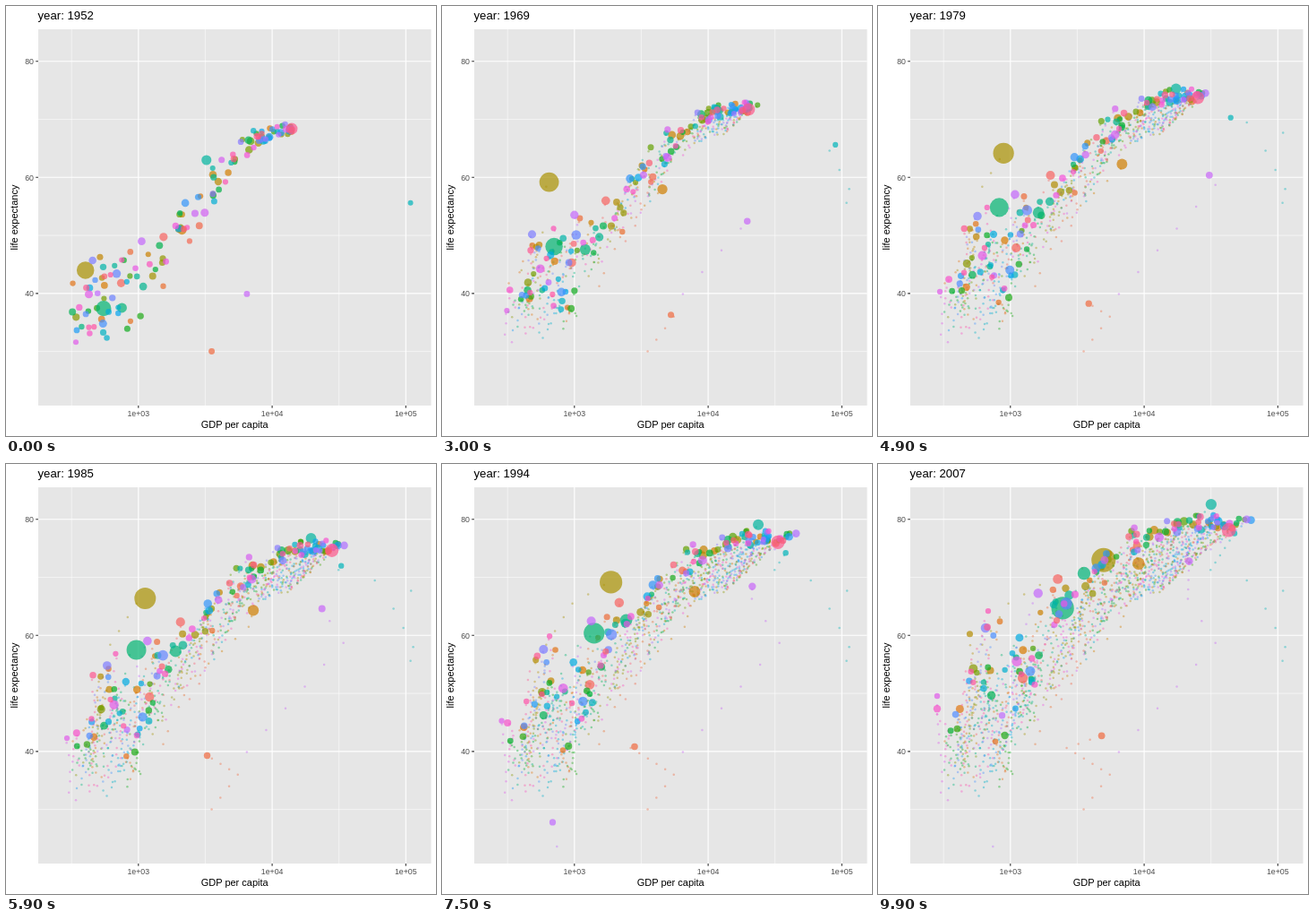
Animation of 480 by 480 pixels, one loop 10000 ms. Source, as an HTML page with a canvas:

```html
<!DOCTYPE html>
<html lang="en">
<head>
<meta charset="utf-8">
<title>Life expectancy and GDP per capita</title>
<style>
  html, body { margin: 0; width: 100%; height: 100%; overflow: hidden; background: #fff; }
  svg, canvas { position: absolute; left: 0; top: 0; width: 480px; height: 480px; }
  text { font: 11px "Liberation Sans", Arial, sans-serif; }
  .tick text { font-size: 8.8px; fill: #4d4d4d; }
  .mid { text-anchor: middle; }
  .end { text-anchor: end; }
  #year { font-size: 13.2px; }
</style>
</head>
<body>
<svg viewBox="0 0 480 480">
  <rect x="36" y="26" width="438.5" height="420" fill="#e6e6e6"/>
  <g stroke="#fff">
    <path stroke-width=".55" d="M73.2 26v420M222.4 26v420M371.7 26v420M36 126.5h438.5M36 256.1h438.5M36 385.6h438.5"/>
    <path stroke-width="1.1" d="M147.8 26v420M297.1 26v420M446.3 26v420M36 61.8h438.5M36 191.3h438.5M36 320.9h438.5"/>
  </g>
  <path stroke="#333" stroke-width="1.1" d="M147.8 446v2.8M297.1 446v2.8M446.3 446v2.8M33.2 61.8h2.8M33.2 191.3h2.8M33.2 320.9h2.8"/>
  <g class="tick mid">
    <text x="147.8" y="458">1e+03</text>
    <text x="297.1" y="458">1e+04</text>
    <text x="446.3" y="458">1e+05</text>
  </g>
  <g class="tick end">
    <text x="31" y="65">80</text>
    <text x="31" y="194.5">60</text>
    <text x="31" y="324">40</text>
  </g>
  <text class="mid" x="255.2" y="471">GDP per capita</text>
  <text class="mid" transform="translate(13 236) rotate(-90)">life expectancy</text>
  <text id="year" x="35.5" y="15">year: 1952</text>
</svg>
<canvas id="plot"></canvas>
<script>
// One node every five years, nine frames apart.
const COUNT = 142, NODES = 12, STEPS = 9, FRAMES = 100;
const ramp = [0xF8766D, 0xDE8C00, 0xB79F00, 0x7CAE00, 0x00BA38, 0x00C08B,
  0x00BFC4, 0x00B4F0, 0x619CFF, 0xC77CFF, 0xF564E3, 0xFF64B0];

let seed = 52;
const rand = () => {
  seed = (seed * 1664525 + 1013904223) >>> 0;
  return seed / 4294967296;
};
const spread = d => (rand() * 2 - 1) * d;
const lerp = (a, b, k) => a + (b - a) * k;
const rise = (v, mid, width) => 1 / (1 + Math.exp((mid - v) / width));

const place = (logGdp, life) => ({
  x: 36 + (logGdp - 2.2487) * 149.15,
  y: 26 + (85.55 - life) * 6.472
});
const radius = pop => 2.84 + 10.67 * Math.sqrt(pop / 1319);

// Hue wheel, with midtones deepened by a gamma curve.
function hue(i) {
  const h = (i - 1) / COUNT * 12, n = Math.floor(h);
  const a = ramp[n], b = ramp[(n + 1) % 12];
  const part = s => Math.round(255 * (lerp(a >> s & 255, b >> s & 255, h - n) / 255) ** 1.22);
  return `rgb(${part(16)},${part(8)},${part(0)})`;
}

const dots = [];
function addDot(i, pop0, pop1, at) {
  const nodes = Array.from({ length: NODES }, (_, n) => at(n));
  dots[i] = { color: hue(i), r0: radius(pop0), r1: radius(pop1), nodes };
}

// Landmark dots: populations in millions, then key points [node, gdp, life].
function landmark(i, pop0, pop1, ...keys) {
  addDot(i, pop0, pop1, n => {
    const j = Math.max(1, keys.findIndex(key => key[0] >= n));
    const [n0, g0, l0] = keys[j - 1], [n1, g1, l1] = keys[j];
    const k = (n - n0) / (n1 - n0);
    return place(lerp(Math.log10(g0), Math.log10(g1), k), lerp(l0, l1, k));
  });
}
landmark(25, 556, 1319, [0, 400, 44], [1, 576, 50.5], [2, 488, 44.5], [3, 613, 58.4], [6, 962, 65.5], [8, 1656, 68.7], [11, 4959, 73]);
landmark(59, 372, 1110, [0, 547, 37.4], [6, 856, 56.6], [11, 2452, 64.7]);
landmark(135, 157, 301, [0, 13990, 68.4], [5, 24073, 73.4], [11, 42952, 78.2]);
landmark(67, 86, 127, [0, 3217, 63], [4, 14779, 73.4], [11, 31656, 82.6]);
landmark(60, 82, 224, [0, 750, 37.5], [11, 3541, 70.7]);
landmark(98, 41, 169, [0, 685, 43.4], [11, 2606, 65.5]);
landmark(15, 57, 190, [0, 2109, 50.9], [5, 6660, 61.5], [11, 9066, 72.4]);
landmark(72, .2, 2.5, [0, 108382, 55.6], [1, 113523, 58], [3, 80895, 64.6], [4, 109348, 67.7], [6, 31354, 71.3], [11, 47307, 77.6]);
landmark(110, 4, 27.6, [0, 6460, 39.9], [5, 34100, 58.7], [7, 21200, 66.3], [11, 21655, 72.8]);
landmark(4, 4.2, 12.4, [0, 3521, 30], [3, 5523, 36], [8, 2628, 40.6], [11, 4797, 42.7]);
landmark(108, 2.5, 8.9, [0, 493, 40], [7, 848, 44], [8, 737, 23.6], [9, 590, 36.1], [11, 863, 46.2]);

// All others: life follows an S-curve of income that lifts over time.
function typical(i) {
  const level = rand() ** 1.1;
  const pop = .5 * Math.exp(4.3 * rand() ** 1.5);
  const base = 2.5 + 1.65 * level;
  const growth = .15 + .4 * level + spread(.38 * (1.1 - level));
  const offset = spread(7), fade = spread(6);
  let drift = 0;
  addDot(i, pop, pop * (2.8 - 1.5 * level), n => {
    const t = n / (NODES - 1);
    if (n) drift += spread(.035);
    const g = Math.max(2.45, base + growth * t ** .85 + drift);
    const s = rise(g, lerp(3.42, 3.45, t), lerp(.22, .25, t));
    const life = lerp(38, 51, t) + lerp(32, 29, t) * s;
    return place(g, life + (offset + fade * t) * (1.12 - s) + spread(.3));
  });
}
for (let i = 1; i <= COUNT; i++) if (!dots[i]) typical(i);

const canvas = document.getElementById("plot"), ctx = canvas.getContext("2d");
const title = document.getElementById("year");
const scale = window.devicePixelRatio || 1;
canvas.width = canvas.height = 480 * scale;
ctx.scale(scale, scale);

function disc(x, y, r, color) {
  ctx.fillStyle = color;
  ctx.beginPath();
  ctx.arc(x, y, r, 0, Math.PI * 2);
  ctx.fill();
}

function draw(frame) {
  title.textContent = "year: " + Math.round(1952 + 55 * frame / 99);
  ctx.clearRect(0, 0, 480, 480);

  // Small marks stay behind at every node already passed.
  ctx.globalAlpha = .4;
  for (let n = 0; n * STEPS < frame; n++)
    dots.forEach(d => disc(d.nodes[n].x, d.nodes[n].y, 1.25, d.color));

  ctx.globalAlpha = .7;
  const n = Math.min(Math.floor(frame / STEPS), NODES - 2), k = frame / STEPS - n;
  dots.forEach(d => {
    const a = d.nodes[n], b = d.nodes[n + 1];
    disc(lerp(a.x, b.x, k), lerp(a.y, b.y, k), lerp(d.r0, d.r1, frame / 99), d.color);
  });
}

const start = performance.now();
let shown = -1;
function tick() {
  const frame = Math.floor((performance.now() - start) / 100) % FRAMES;
  if (frame !== shown) draw(shown = frame);
  requestAnimationFrame(tick);
}
tick();
</script>
</body>
</html>
```
